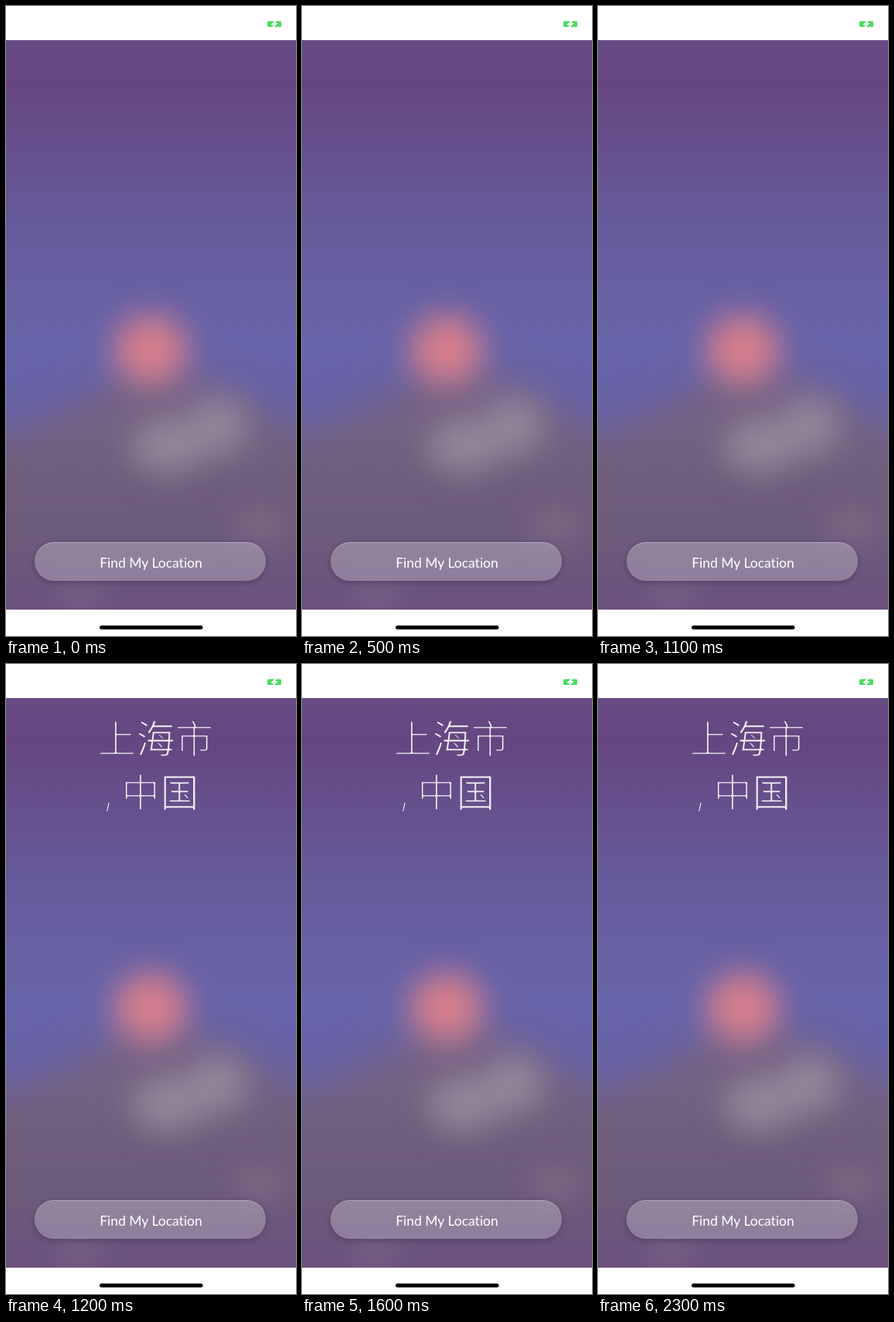
Write an HTML page with a canvas that moves like this. It is 375x812 px and loops after 2.4 s.

```html
<!DOCTYPE html>
<html lang="en">
<head>
<meta charset="utf-8">
<title>Find My Location</title>
<style>
  html, body { margin: 0; width: 100%; height: 100%; overflow: hidden; background: #fff; }
  canvas { position: absolute; left: 0; top: 0; }
  .button {
    position: absolute; left: 37px; top: 691px; width: 299px; height: 50px;
    box-sizing: border-box; padding: 2px 0 0 2px; border-radius: 25px;
    background: linear-gradient(rgba(255,255,255,.26), rgba(255,255,255,.24));
    box-shadow: 0 2px 7px rgba(45,25,60,.36), inset 0 1px 0 rgba(255,255,255,.28);
    color: #fff; font: 400 17.5px/50px Lato, "Open Sans", sans-serif;
    font-variant-ligatures: none; text-align: center;
  }
</style>
</head>
<body>
<canvas id="stage" width="375" height="812"></canvas>
<div class="button">Find My Location</div>
<script>
const W = 375, H = 812, TOP = 44, BOTTOM = 778;
const LOOP = 2400, FOUND_AT = 1200;
const CJK = '100 50px "Noto Sans CJK SC", "Noto Sans CJK", sans-serif';
const LATIN = '100 50px Inter, Lato, sans-serif';

function layer(draw) {
  const c = document.createElement('canvas');
  c.width = W;
  c.height = H;
  draw(c.getContext('2d'));
  return c;
}

function vertical(g, stops) {
  const fill = g.createLinearGradient(0, 0, 0, H);
  for (const [y, color] of stops) fill.addColorStop(y / H, color);
  return fill;
}

// Fills the union of some ellipses [x, y, rx, ry] with one soft edge.
function glow(g, blur, color, ...ellipses) {
  g.filter = `blur(${blur}px)`;
  g.fillStyle = color;
  g.beginPath();
  for (const [x, y, rx, ry] of ellipses) {
    g.moveTo(x + rx, y);
    g.ellipse(x, y, rx, ry, 0, 0, Math.PI * 2);
  }
  g.fill();
  g.filter = 'none';
}

function trace(g, points) {
  g.beginPath();
  for (const [x, y] of points) g.lineTo(x, y);
  g.closePath();
}

function drawScenery(g) {
  g.save();
  g.beginPath();
  g.rect(0, TOP, W, BOTTOM - TOP);
  g.clip();

  g.fillStyle = vertical(g, [
    [44, '#674b83'], [98, '#654681'], [200, '#66528f'],
    [310, '#665d9f'], [430, '#6864a9'], [520, '#6762a8']
  ]);
  g.fillRect(0, 0, W, H);

  g.filter = 'blur(25px)';
  g.fillStyle = vertical(g, [
    [480, '#786585'], [560, '#72617f'], [640, '#6d5c79'],
    [710, '#6c597b'], [778, '#6a507e']
  ]);
  trace(g, [
    [-90, 570], [0, 551], [80, 519], [140, 483], [187, 470],
    [240, 472], [300, 500], [375, 541], [460, 570], [460, 950], [-90, 950]
  ]);
  g.fill();
  g.filter = 'none';

  glow(g, 20, '#d87f8b', [187, 443, 47, 45]);
  glow(g, 21, 'rgba(153,139,158,.9)', [274, 541, 38, 37], [209, 567, 47, 35]);
  glow(g, 18, 'rgba(150,132,150,.36)', [328, 670, 34, 24]);
  glow(g, 16, 'rgba(150,125,155,.3)', [95, 760, 34, 18]);
  g.restore();
}

function drawSystem(g) {
  g.fillStyle = '#4fd966';
  g.beginPath();
  g.roundRect(338, 19.5, 18, 7.5, 1.5);
  g.fill();
  g.fillStyle = g.strokeStyle = '#fff';
  g.lineWidth = 1;
  trace(g, [[349.5, 18.5], [343, 24], [346.5, 24], [345, 28], [351, 22.5], [347.5, 22.5]]);
  g.fill();
  g.stroke();

  g.fillStyle = '#000';
  g.beginPath();
  g.roundRect(121, 798.5, 133.5, 5, 2.5);
  g.fill();
}

// Trims the outline of a glyph to leave hairline strokes.
function hairline(g, text, x, y, trim) {
  g.font = CJK;
  g.fillStyle = 'rgba(255,255,255,.93)';
  g.fillText(text, x, y);
  g.globalCompositeOperation = 'destination-out';
  g.lineWidth = trim;
  g.lineJoin = 'round';
  g.strokeText(text, x, y);
  g.globalCompositeOperation = 'source-over';
}

function drawPlace(g) {
  hairline(g, '上', 118.5, 114.5, 2.3);
  hairline(g, '海', 168.5, 114.5, 1.6);
  hairline(g, '市', 218.5, 114.5, 2.3);
  hairline(g, '中', 149, 183.5, 2.3);
  hairline(g, '国', 199.5, 183.5, 1.7);
  g.font = LATIN;
  g.fillText(',', 126, 183);
}

const ctx = document.getElementById('stage').getContext('2d');
const backdrop = layer(g => { drawScenery(g); drawSystem(g); });
const place = layer(drawPlace);

const start = performance.now();
function render(now) {
  const t = Math.max(0, now - start) % LOOP;
  ctx.clearRect(0, 0, W, H);
  ctx.drawImage(backdrop, 0, 0);
  if (t >= FOUND_AT) ctx.drawImage(place, 0, 0);
  requestAnimationFrame(render);
}
render(start);
</script>
</body>
</html>
```
